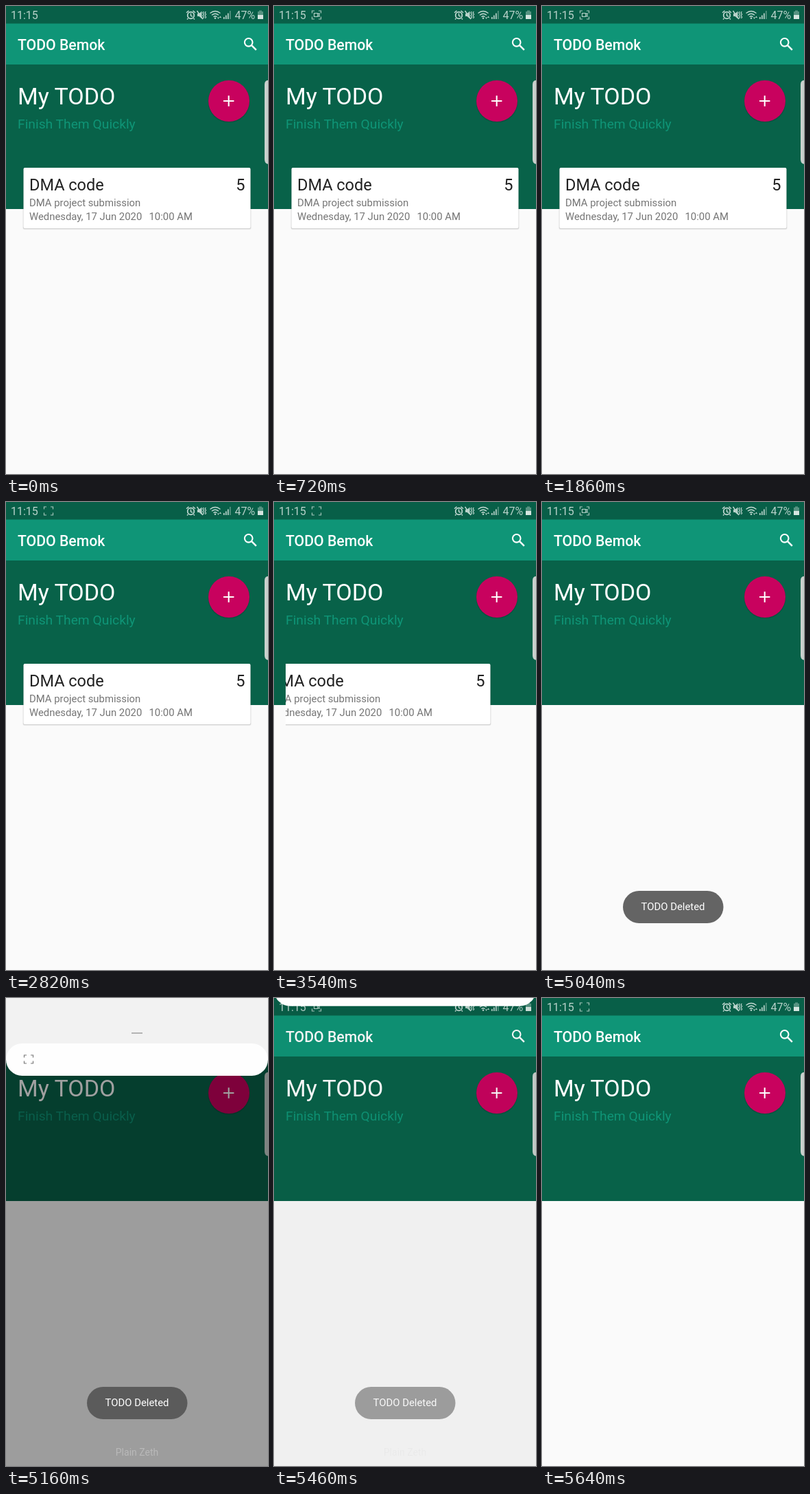
Write an HTML page that moves like this. It is 382 px wide and 680 px high and loops after 6.24 s.

```html
<!DOCTYPE html>
<html lang="en">
<head>
<meta charset="utf-8">
<title>To-do app</title>
<style>
  html, body { margin: 0; width: 100%; height: 100%; overflow: hidden; background: #fafafa; }
  svg { display: block; width: 100vw; height: 100vh; font-family: Roboto, sans-serif; }
</style>
</head>
<body>
<svg viewBox="0 0 382 680">
  <defs>
    <clipPath id="list"><rect x="17" y="225" width="348" height="455"/></clipPath>
    <path id="corners" d="M0 3.5V0H3.5M9.5 0H13V3.5M13 8.5V12H9.5M3.5 12H0V8.5" fill="none" stroke-width="1.2"/>
  </defs>

  <rect width="382" height="680" fill="#fafafa"/>
  <rect width="382" height="295" fill="#086249"/>
  <rect width="382" height="26" fill="#085f48"/>
  <rect y="25.5" width="382" height="59.5" fill="#0f9577"/>

  <!-- status bar -->
  <g fill="#b8d2ca" stroke="none">
    <text x="7" y="19" font-size="16">11:15</text>
    <text x="333.5" y="19" font-size="16">47%</text>
    <g id="rec" transform="translate(55.5 7)">
      <use href="#corners" stroke="#a5c6bb"/>
      <path id="cam" d="M3 3.5H8.2V5.2L10.5 3.8V8.2L8.2 6.8V8.5H3Z" fill="none" stroke="#b8d2ca" stroke-width="1.1"/>
    </g>
    <g fill="none" stroke="#c4dad3" stroke-width="1.7">
      <circle cx="269.5" cy="13.5" r="4.8"/>
      <path d="M269.5 10.5V14L272 15.3M263 9.8L266.5 6.9M276 9.8L272.5 6.9M265.5 18L264 19.5M273.5 18L275 19.5" stroke-width="1.4"/>
      <path d="M278.5 7L287 19" stroke-width="1.4"/>
      <path d="M288.3 8L287 10L288.6 12L287 14L288.6 16L287.5 18M291.3 8L290 10L291.6 12L290 14L291.6 16L290.5 18" stroke-width="1.2"/>
      <path d="M297.5 10.5Q305 4.5 312.5 10.5M300 13.2Q305 9.2 310 13.2M302.5 15.8Q305 13.8 307.5 15.8" stroke-width="1.4"/>
    </g>
    <path d="M279 11H281.5L285.5 7.5V18.5L281.5 15H279Z"/>
    <circle cx="305" cy="17.8" r="1.3"/>
    <path d="M309.5 19L308 16.5H311ZM312.5 14.5L311 17H314Z"/>
    <path d="M317 16H318.7V19H317ZM320 13.5H321.7V19H320ZM323 10.5H324.7V19H323Z"/>
    <path d="M326 7H327.7V19H326Z" opacity=".45"/>
    <path d="M369 6.5H373V8H375V19H367V8H369Z" opacity=".45"/>
    <path d="M367 13H375V19H367Z" fill="#d5e5e0"/>
  </g>

  <!-- toolbar and header -->
  <g fill="#fff">
    <text x="17" y="63.5" font-size="21.2" font-weight="500">TODO Bemok</text>
    <text x="17" y="143" font-size="34">My TODO</text>
    <text x="17" y="177.5" font-size="19.25" fill="#0f9577">Finish Them Quickly</text>
  </g>
  <g fill="none" stroke="#fff" stroke-width="2.1">
    <circle cx="353.7" cy="52.8" r="5.8"/>
    <path d="M357.8 56.9L364.8 63.9" stroke-width="2.5"/>
  </g>
  <circle cx="325" cy="139" r="30.6" fill="#000" opacity=".14"/>
  <circle cx="325" cy="138" r="30" fill="#c8025e"/>
  <path d="M317 138H332.4M324.7 130.3V145.7" stroke="#fff" stroke-width="2.1"/>
  <path d="M382 108H381Q377 109 377 114V223Q377 228 381 229.500H382Z" fill="#c9d0cd"/>

  <!-- task card -->
  <g clip-path="url(#list)">
    <g id="card">
      <rect x="24.5" y="235" width="333" height="89.800" rx="2.500" fill="#000" opacity=".09"/>
      <rect x="25" y="235" width="332" height="88.900" rx="2" fill="#000" opacity=".08"/>
      <rect x="25.500" y="235" width="331" height="88" rx="2" fill="#fff"/>
      <g font-size="23.500" fill="#212121">
        <text x="34" y="268">DMA code</text>
        <text x="348.500" y="268" text-anchor="end">5</text>
      </g>
      <g font-size="14.860" fill="#757575">
        <text x="34" y="290.500">DMA project submission</text>
        <text x="34" y="310.500">Wednesday, 17 Jun 2020</text>
        <text x="208.500" y="310.500">10:00 AM</text>
      </g>
    </g>
  </g>

  <!-- notification shade -->
  <rect id="dim" width="382" height="680" fill="#000"/>
  <text id="carrier" x="191" y="665" font-size="14" fill="#b9b9b9" text-anchor="middle">Plain Zeth</text>
  <g id="shade">
    <rect y="-60" width="382" height="150" fill="#f2f2f2"/>
    <rect x="183" y="50" width="16" height="2" fill="#b4b4b4"/>
    <rect y="66" width="382" height="47" rx="23.500" fill="#fefefe"/>
    <use href="#corners" x="26.500" y="83" stroke="#777"/>
  </g>

  <g id="toast">
    <rect x="118" y="565" width="146.500" height="47" rx="23.500" fill="#555" fill-opacity=".9"/>
    <text x="191" y="593" font-size="14.860" fill="#fff" text-anchor="middle">TODO Deleted</text>
  </g>
</svg>
<script>
const LOOP = 6240, STEP = 60, SHADE_H = 113;
const [rec, cam, card, dim, carrier, shade, toast] =
  ["rec", "cam", "card", "dim", "carrier", "shade", "toast"].map(id => document.getElementById(id));

// start and end of each time the camera inside the brackets is lit
const blinks = [[720, 1320], [1860, 2400], [3000, 3540], [4080, 4620], [5040, 5580]];

const ramp = (t, from, to) => Math.min(1, Math.max(0, (t - from) / (to - from)));
const easeOut = p => 1 - (1 - p) ** 2;
const smooth = p => p * p * (3 - 2 * p);
const show = (el, on) => el.setAttribute("visibility", on ? "visible" : "hidden");
const fade = (el, a) => el.setAttribute("opacity", a);
const move = (el, x, y) => el.setAttribute("transform", `translate(${x} ${y})`);

function draw(t) {
  fade(rec, ramp(t, 60, 360));
  fade(cam, blinks.some(([on, off]) => t >= on && t < off) ? 1 : 0);

  const swipe = t < 3540 ? 0 : 41 + 310 * ramp(t, 3540, 3840);
  move(card, -swipe, 0);
  show(card, t < 3840);

  fade(toast, easeOut(ramp(t, 3995, 4495)) * (1 - ramp(t, 5340, 5640)));

  const open = t < 5160 ? 0 : 1 - smooth(ramp(t, 5220, 5520));
  show(shade, open > 0);
  move(shade, 0, SHADE_H * (open - 1));
  fade(dim, 0.372 * open);
  fade(carrier, open);
}

let start;
function tick(now) {
  start ??= now;
  const t = (now - start) % LOOP;
  draw(Math.floor(t / STEP) * STEP);
  requestAnimationFrame(tick);
}
draw(0);
requestAnimationFrame(tick);
</script>
</body>
</html>
```
